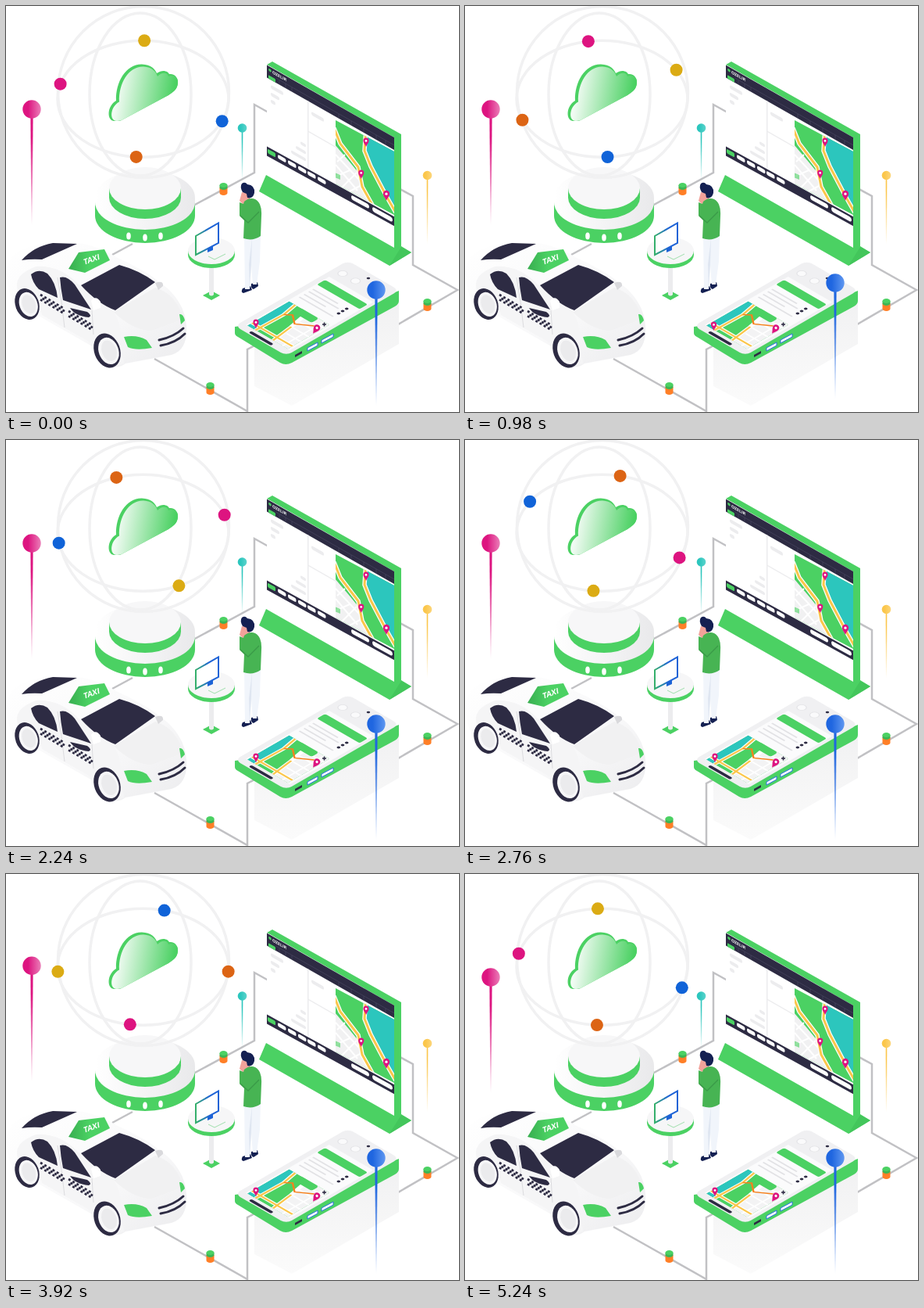
Write an HTML page that moves like this. It is 580 px wide and 519 px high and loops after 5260 ms.

```html
<!DOCTYPE html>
<html lang="en">
<head>
<meta charset="utf-8">
<title>Taxi dispatch</title>
<style>
  html, body { margin: 0; width: 100%; height: 100%; overflow: hidden; background: #fff; }
  svg { display: block; width: 580px; height: 519px; }
  .g { fill: #4bd163; }
  .dark { fill: #2d2b43; }
  .ring { fill: none; stroke: #f1f1f2; stroke-width: 3.5; }
  .wire { fill: none; stroke: #c1c1c4; stroke-width: 2.5; }
  .pill { fill: #ececee; }
  text { font-family: "Open Sans", Arial, sans-serif; font-weight: 700; fill: #fff; }
</style>
</head>
<body>
<svg viewBox="0 0 580 519">
  <defs>
    <linearGradient id="cloud" gradientUnits="userSpaceOnUse" x1="140" y1="104" x2="214" y2="116">
      <stop offset=".05" stop-color="#f1fbf3"/><stop offset="1" stop-color="#4bd163"/>
    </linearGradient>
    <linearGradient id="disc"><stop offset="0" stop-color="#fff"/><stop offset="1" stop-color="#e9e9eb"/></linearGradient>
    <linearGradient id="body" x1="0" y1="0" x2="1" y2="1">
      <stop offset="0" stop-color="#fff"/><stop offset=".6" stop-color="#f8f8f9"/><stop offset="1" stop-color="#ececee"/>
    </linearGradient>
    <linearGradient id="shade" x1="0" y1="0" x2="0" y2="1">
      <stop offset="0" stop-color="#f1f1f2"/><stop offset="1" stop-color="#fbfbfb"/>
    </linearGradient>
    <linearGradient id="bezel"><stop offset="0" stop-color="#35b06a"/><stop offset=".6" stop-color="#1e63d6"/></linearGradient>
    <linearGradient id="sign"><stop offset="0" stop-color="#38ae50"/><stop offset=".5" stop-color="#4bd163"/></linearGradient>
    <clipPath id="map"><path d="M422 146L497 186V267L422 227Z"/></clipPath>
    <clipPath id="phoneMap"><rect x="9" y="6" width="62" height="60"/></clipPath>
    <g id="marker">
      <path d="M0 6C-1 3-3.600 1-3.600-1.800A3.600 3.600 0 0 1 3.600-1.800C3.600 1 1 3 0 6Z" fill="#dd1480"/>
      <circle cy="-1.600" r="1.400" fill="#fff"/>
    </g>
  </defs>

  <g class="wire">
    <path d="M240 255L318 213V126L336 136"/>
    <path d="M136 318L162 304"/>
    <path d="M497 230L521 243V331L578 363L502 407L474 393"/>
    <path d="M190 451L309 518V439L326 430"/>
  </g>

  <!-- podium -->
  <path class="g" d="M114 249V268A64 35 0 0 0 242 268V249Z"/>
  <path fill="url(#disc)" d="M114 245V251A64 35 0 0 0 242 251V245A64 35 0 0 0 114 245Z"/>
  <path class="g" d="M132 233V245A46 27 0 0 0 224 245V233Z"/>
  <ellipse cx="178" cy="233" rx="46" ry="27" fill="#f7f7f8"/>
  <g fill="#fff">
    <ellipse cx="157" cy="294" rx="2.800" ry="4.500"/><ellipse cx="178" cy="296" rx="2.800" ry="4.500"/><ellipse cx="198" cy="294" rx="2.800" ry="4.500"/>
  </g>

  <!-- globe -->
  <circle class="ring" cx="176" cy="110" r="109.500"/>
  <ellipse class="ring" cx="172" cy="113" rx="65" ry="104"/>
  <path id="orbit" class="ring" d="M285 118.700A109.500 74.500 0 0 1 66 118.700A109.500 74.500 0 0 1 285 118.700Z"/>
  <path class="g" d="M138 147C129 146 129 128 141 121C140 97 154 74 174 74.500C186 75 191 81 193 86C201 80 208 84 209 87C216 86 221 92 220 99C219 107 214 110 208 114L146 147Z"/>
  <path fill="url(#cloud)" d="M142 147C132 147 133 129 145 122.500C144 99 157 77 176 77.500C187 78 192 84 194 90C201 83 207 86 208 90C215 87 221 92 220 99C219 107 214 110 208 114L147 146.500Z"/>

  <!-- large monitor -->
  <path class="g" d="M333 216L497 309L506 307L519 315L491 332L324 237Z"/>
  <path fill="#43c65b" d="M506 308L519 315L491 332Z"/>
  <path class="g" d="M334 75L341 71L506 164V308L497 313V169Z"/>
  <path fill="#fff" d="M334 75L497 168V286L334 193Z"/>
  <g transform="matrix(1 .567 0 1 334 75.500)">
    <rect width="163" height="16" class="dark"/>
    <path d="M12 10H163M16 10V15M24 10V15M32 10V15M92 10V15M108 10V15M124 10V15M140 10V15M152 10V15" stroke="#45435c" stroke-width=".8" fill="none"/>
    <circle cx="4" cy="4.500" r="1.800" class="g"/>
    <text x="7" y="6.800" font-size="5.200">OZELIR</text>
    <rect x="2" y="11.500" width="9" height="4.500" rx="1" class="g"/>
    <g class="pill">
      <rect x="5" y="22.500" width="16" height="4.500" rx="2"/><rect x="5" y="32" width="11" height="4.500" rx="2"/><rect x="5" y="41" width="6" height="4.500" rx="2"/>
      <rect x="43" y="73" width="7" height="4" rx="2"/><rect x="37" y="82" width="13" height="4" rx="2"/><rect x="31" y="91" width="19" height="4" rx="2"/>
      <rect x="57" y="27" width="16" height="4.500" rx="2"/>
      <rect x="52" y="16" width="1.500" height="86"/><rect x="53" y="54" width="35" height="1.500"/>
    </g>
  </g>
  <g transform="matrix(1 .55 0 1 334 179.500)">
    <rect width="163" height="12" class="dark"/>
    <rect x="1" y="2.500" width="10" height="5.500" rx="1.500" class="g"/>
    <g id="tabs" fill="#fff">
      <rect x="108" y="2.500" width="23" height="5.500" rx="2.700"/><rect x="135" y="2.500" width="26" height="6" rx="3"/>
    </g>
  </g>
  <g clip-path="url(#map)">
    <path class="g" d="M420 140H500V272H420Z"/>
    <path fill="#2cc6bd" d="M461 160L500 182V258L487 243L467 205L459 185Z"/>
    <path fill="#f1f1f2" d="M420 176L438 197L452 214L456 236L474 264H420Z"/>
    <path d="M422 190L452 222M422 203L450 236M422 218L440 210M430 232L449 213M438 238L457 228M434 190L424 199" stroke="#fff" stroke-width="2"/>
    <path class="g" d="M421 213L428 216V222L421 219Z" opacity=".6"/>
    <g fill="none">
      <path id="roads" d="M420 156L428 176L451 206L456 231L470 256M461 156L459 185L467 205L487 243L499 264" stroke="#fff" stroke-width="5.500"/>
      <path d="M420 156L428 176L451 206L456 231L470 256M461 156L459 185L467 205L487 243L499 264" stroke="#fbc64b" stroke-width="3"/>
    </g>
  </g>
  <use href="#marker" x="461" y="174"/>
  <use href="#marker" id="mapMarker"/>
  <use href="#marker" transform="translate(487 242) scale(1.150)"/>

  <!-- desk -->
  <path class="g" d="M252 370L263 364L274 370L263 376Z"/>
  <path fill="#ececee" d="M260 330H266V369Q263 372 260 369Z"/>
  <path class="g" d="M233 313V318A30 17 0 0 0 293 318V313Z"/>
  <ellipse cx="263" cy="313" rx="30" ry="17" fill="#f6f6f7"/>
  <path fill="#1e63d6" d="M258 305L265 302V312L258 315Z"/>
  <path fill="#fff" stroke="url(#bezel)" stroke-width="2" d="M243 294L272 277.500V303L243 318Z"/>
  <path fill="none" stroke="#9fdfac" d="M259 320L267 324L281 317"/>

  <!-- observer -->
  <path fill="#142052" d="M303 361L313 358L315 363L304 367Q300 366 303 361ZM314 355L322 353L323 358L317 362Q313 361 314 355Z"/>
  <path fill="#f1f5fb" d="M305 294L326 293L325 326L321 356H316L314 330L312 362H306Z"/>
  <path fill="#dfe6f1" d="M315 297L314 330L312 361L311 330Z"/>
  <path fill="#f2a29a" d="M302 238L312 240L312 251L303 253L299 249Z"/>
  <path fill="#47b453" d="M305 250Q312 244 319 247Q328 252 327 268L326 294Q316 301 304 297L305 274L299 268L299 251L304 253Z"/>
  <path fill="none" stroke="#3a9a48" stroke-width="1.300" d="M300 268L310 277L324 263"/>
  <path fill="#142052" d="M302 227Q306 224 309 228Q319 229 318 239Q316 247 309 245L308 240L303 238Q299 231 302 227Z"/>

  <!-- taxi -->
  <path fill="url(#body)" d="M1 345C-1 322 15 307 52 303C82 300 106 302 132 316C152 327 178 337 195 352C214 364 230 385 231 409C232 429 227 441 212 446L153 457C148 461 142 463 132 460L112 436L45 398L12 381C4 370 2 358 1 345Z"/>
  <path fill="#f5f5f6" d="M38 333Q69 331 93 356L137 390Q148 405 148 435L151 457L142 460C151 430 133 416 114 423L108 430L46 395C42 375 31 361 15 363C12 351 16 342 38 333Z"/>
  <path fill="#f1f1f2" d="M138 391L191 360Q217 367 227 400L186 415Q161 414 138 391Z"/>
  <path class="dark" d="M20 325Q36 307 60 303L91 304L46 324Q32 323 20 325Z"/>
  <path class="dark" d="M96 357L145 331Q171 338 191 353L140 389Q118 381 96 357ZM32 343Q42 335 53 342Q64 353 66 373L42 362Q34 354 32 343ZM69 347Q78 344 88 356L109 388L73 376Q70 361 69 347Z"/>
  <path fill="none" stroke="#dcdcdf" d="M66 347L71 378L75 411M110 389L112 420"/>
  <path fill="#fff" d="M109 377Q115 369 121 378V386L112 389Z"/>
  <path fill="#d9d9dc" d="M191 354Q202 350 201 358L195 363Z"/>
  <path class="dark" d="M82 386L104 391Q111 396 106 398Q88 396 82 386Z"/>
  <g fill="none" stroke="#2d2b43" stroke-width="2.700" stroke-dasharray="3 3">
    <path d="M44 369L75 387M80 390L111 408"/>
    <path d="M44 372.200L75 390.200M80 393.200L111 411.200" stroke-dashoffset="3"/>
    <path d="M44 375.400L75 393.400M80 396.400L111 414.400"/>
  </g>
  <path class="g" d="M151 423Q168 420 180 427L187 437Q166 441 156 436ZM222 394Q227 393 229 402L224 407Z"/>
  <path fill="none" stroke="#2d2b43" stroke-width="3" stroke-linecap="round" d="M196 427Q215 423 227 412M198 434Q217 431 229 419"/>
  <g id="wheels"></g>
  <path fill="url(#sign)" d="M80 336L93 315L126 311L133 325L101 341Z"/>
  <text transform="translate(100 331) rotate(-20) skewX(-12)" font-size="9.800">TAXI</text>

  <!-- phone -->
  <path fill="url(#shade)" d="M318 432L358 455L503 375V432L366 511L318 486Z"/>
  <path class="g" d="M293 410V418Q293 421 297 423L351 456Q358 460 366 456L498 384Q503 381 503 377V364L437 390Z"/>
  <g transform="matrix(.866 -.5 .866 .5 293 409)">
    <rect width="167" height="76" rx="8" fill="#f0f0f2"/>
    <g transform="translate(.7 2.700)">
      <rect x="9" y="4" width="123" height="65" fill="#fbfbfc"/>
      <g clip-path="url(#phoneMap)">
        <rect x="9" y="6" width="62" height="60" class="g"/>
        <rect x="9" y="6" width="62" height="12" fill="#2cc6bd"/>
        <path fill="#f3f3f4" d="M9 44L40 40L71 34V66H9Z"/>
        <path d="M28 45V66M40 43V66M52 40V66M62 38V66M9 58H71" stroke="#fff" stroke-width="2"/>
        <path id="lanes" d="M9 18L50 19L71 15M9 44L40 40L71 34M16 6V66" fill="none" stroke="#fff" stroke-width="5"/>
        <path d="M9 18L50 19L71 15M9 44L40 40M16 6V66" fill="none" stroke="#fbc64b" stroke-width="2.500"/>
        <path d="M50 19L56 26L46 39L58 56" fill="none" stroke="#f5821f" stroke-width="2"/>
      </g>
      <rect x="60" y="22" width="11" height="28" rx="3.500" class="g"/>
      <rect x="113" y="5" width="12" height="63" rx="2.500" class="g"/>
      <path d="M104 8V45M98 8V52M91 8V40M84 8V58" stroke="#e2e2e5" stroke-width="2"/>
      <path d="M3 18V47" stroke="#2d2b43" stroke-width="4" stroke-linecap="round"/>
      <g class="dark"><circle cx="92" cy="58" r="1.900"/><circle cx="98" cy="58" r="1.900"/><circle cx="104" cy="58" r="1.900"/><circle cx="159" cy="35" r="1.800"/></g>
      <g fill="#fafafb" stroke="#e3e3e6"><circle cx="146" cy="10" r="5"/><circle cx="146" cy="29" r="5"/></g>
    </g>
  </g>
  <path fill="#fff" stroke="#2a6fe0" d="M386 437L399 430V434L386 441ZM404 427L419 419V423L404 431Z"/>
  <path class="dark" d="M370 446L379 441V444L370 449Z"/>
  <path d="M405 407H410M407.500 404.500V409.500" stroke="#2d2b43" stroke-width="1.500"/>
  <use href="#marker" transform="translate(397 413) rotate(35) scale(1.150)"/>
  <use href="#marker" id="phoneMarker"/>

  <g id="posts"></g>
  <g id="pins"></g>
  <g id="balls"></g>
</svg>
<script>
const LOOP = 5260;
const $ = id => document.getElementById(id);
const add = (id, markup) => $(id).insertAdjacentHTML("beforeend", markup);
const move = (el, x, y) => el.setAttribute("transform", `translate(${x} ${y})`);

for (const x of [14, 27, 40, 52, 65])
  add("tabs", `<rect x="${x}" y="2.500" width="10.500" height="5" rx="2"/>`);

for (const [x, y, s] of [[27, 381, 1], [129.5, 440.5, 1.1]])
  add("wheels", `<g transform="translate(${x} ${y}) rotate(-20) scale(${s})">
    <ellipse rx="15" ry="20.500" class="dark"/>
    <ellipse cx="1.500" cy="1" rx="11.500" ry="16" fill="#f7f7f8"/>
    <ellipse cx="2" cy="1" rx="8.500" ry="12.500" fill="#ebebed"/></g>`);

for (const [x, y] of [[278.5, 229], [539.5, 377], [261.5, 484]])
  add("posts", `<g transform="translate(${x} ${y})">
    <path fill="#ff7f27" d="M-5 3V10A5 3 0 0 0 5 10V3Z"/>
    <path fill="#3cb554" d="M-5 0V3A5 3 0 0 0 5 3V0Z"/>
    <ellipse rx="5" ry="3" class="g"/></g>`);

// One smooth rise and fall between two times
function bob(t, start, end, height) {
  if (t <= start || t >= end) return 0;
  return height * Math.sin(Math.PI * (t - start) / (end - start)) ** 2;
}

const pins = [
  { x: 33, y: 132, r: 11.7, tail: 148, color: "#dd1480", tint: "#ea7fb8", rise: [2950, 4400, 20] },
  { x: 302.5, y: 156, r: 5.8, tail: 66, color: "#2cc6bd", tint: "#5cd3cc" },
  { x: 539.5, y: 216.5, r: 5.8, tail: 88, color: "#fbc64b", tint: "#fcd67c" },
  { x: 474, y: 363, r: 11.7, tail: 148, color: "#1f66e0", tint: "#5f97f0", rise: [300, 1600, 9] }
];
pins.forEach((p, i) => {
  const w = p.r / 7;
  add("pins", `<g>
    <linearGradient id="head${i}"><stop offset=".3" stop-color="${p.color}"/><stop offset="1" stop-color="${p.tint}"/></linearGradient>
    <linearGradient id="tail${i}" x1="0" y1="0" x2="0" y2="1"><stop offset=".25" stop-color="${p.color}"/><stop offset="1" stop-color="${p.color}" stop-opacity="0"/></linearGradient>
    <path fill="url(#tail${i})" d="M${-w} 0H${w}L.6 ${p.tail}H-.6Z"/>
    <circle r="${p.r}" fill="url(#head${i})"/></g>`);
  p.el = $("pins").lastElementChild;
});

// Start is the distance along the orbit, clockwise from its right end
const balls = [
  { color: "#dbab14", start: 434, lead: 5 },
  { color: "#dd1480", start: 311 },
  { color: "#1063d8", start: 30 },
  { color: "#dc6414", start: 154.5 }
];
for (const b of balls) {
  add("balls", `<circle r="8" fill="${b.color}"/>`);
  b.el = $("balls").lastElementChild;
}
const orbit = $("orbit"), length = orbit.getTotalLength();

function draw(t) {
  for (const b of balls) {
    const lead = (b.lead || 0) * Math.max(0, 1 - t / 900);
    const p = orbit.getPointAtLength((b.start + lead + length * t / LOOP) % length);
    move(b.el, p.x, p.y);
  }
  for (const p of pins) move(p.el, p.x, p.y - (p.rise ? bob(t, ...p.rise) : 0));
  move($("mapMarker"), 454.7, 215 - bob(t, 1300, 2200, 8));
  const dip = bob(t, 500, 1460, 3);
  move($("phoneMarker"), 320 - dip / 2, 406 + dip);
}

const begin = performance.now();
function tick() {
  draw((performance.now() - begin) % LOOP);
  requestAnimationFrame(tick);
}
tick();
</script>
</body>
</html>
```
